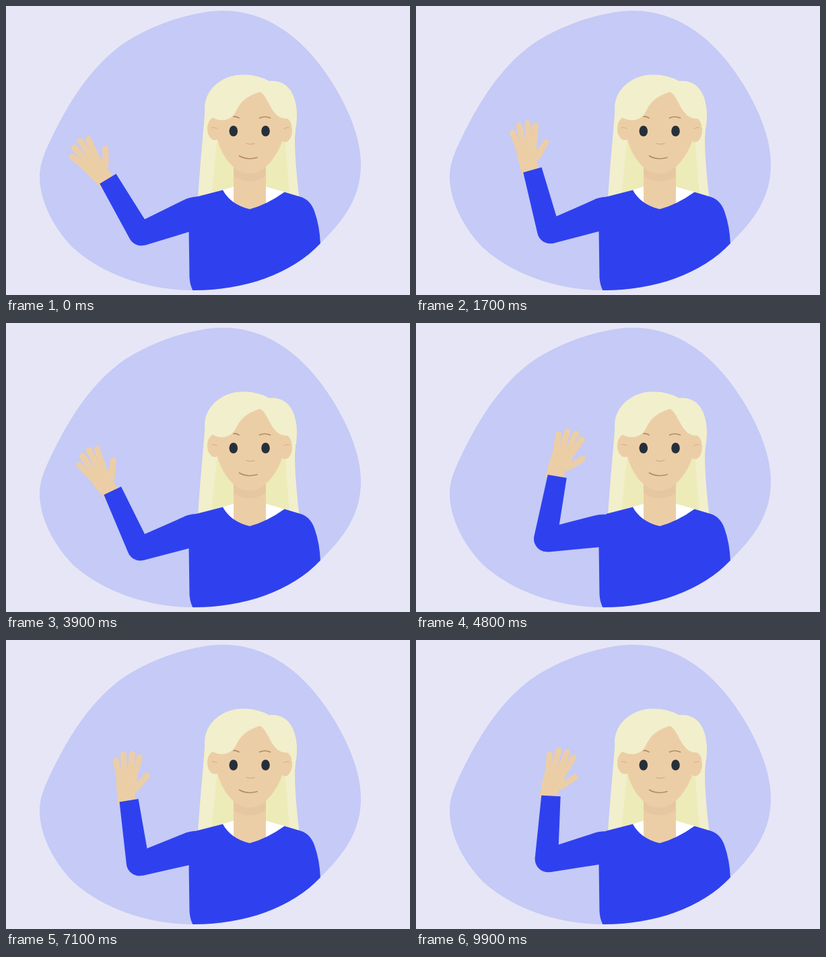
Animation, 600 px wide and 431 px high, one loop 10 s. Source, as an HTML page:

```html
<!DOCTYPE html>
<html lang="en">
<head>
<meta charset="utf-8">
<title>Waving woman</title>
<style>
  html, body { margin: 0; width: 100%; height: 100%; overflow: hidden; background: #e6e6f6; }
  svg { display: block; width: 100vw; height: 100vh; }
  .blob { fill: #c5caf6; }
  .blue { fill: #2f41ee; }
  .skin { fill: #eccea6; }
  .shade { fill: #e6c7a2; }
  .hair { fill: #f2efcc; }
  .hair-back { fill: #edebb8; }
  .eye { fill: #27303a; }
  .line { fill: none; stroke: #b18c62; stroke-width: 1.7; stroke-linecap: round; }
  .soft { stroke: #d8b186; stroke-width: 1.4; }
  .fingers { fill: none; stroke: #eccea6; stroke-width: 9; stroke-linecap: round; }
</style>
</head>
<body>
<svg viewBox="0 0 600 431">
  <defs>
    <path id="blob" d="M322 7C392 7 447 53 485 115C511 157 527 200 527 236C527 285 503 318 467 354C424 400 354 424 278 424C207 424 140 398 99 360C70 330 50 290 50 254C50 235 58 217 68 196C95 140 125 95 165 63C205 32 275 7 322 7Z"/>
    <clipPath id="inside"><use href="#blob"/></clipPath>
  </defs>
  <use href="#blob" class="blob"/>

  <!-- head -->
  <path class="hair" d="M296 148C293 190 288 240 285 286H435.500Q429 232 429 197L432 160Z"/>
  <path class="hair-back" d="M314 195L305 284H421L414 195Z"/>
  <path fill="#fff" d="M322 274.500L338 269.500H386L413.500 277.500L390 300L362 308L334 300Z"/>
  <path class="skin" d="M338 235V298L362 308L386 300V235Z"/>
  <path class="shade" d="M338 240V254Q361 269 385.500 254V240Z"/>
  <ellipse class="skin" cx="310" cy="183" rx="11" ry="17"/>
  <ellipse class="skin" cx="414.500" cy="185" rx="10.500" ry="18"/>
  <path class="skin" d="M312 150L313 196C321 226 336 242 350 248Q361 252 373 248C390 240 404 222 412 196L414 150L378 122Z"/>
  <path class="hair" d="M377 128C386 132 390 148 399 159Q405 168 418 168Q425 169 424.500 182L431 180Q433 160 431 150C428 126 414 109 391 112Q373 102 352 102.500C326 102 296 120 295 152L296.500 164Q303 162 308 167C320 173 334 171 341 158C348 144 354 136 377 128Z"/>
  <path class="line soft" d="M306 181.500Q310 181 313 183M413 183Q416 181 420 181.500M357 205Q363 207 369 205"/>
  <path class="line" d="M338 165Q342 164.500 346 167M376.500 167Q384 163.500 392.500 167M346.500 223.500Q358 230.500 373 226"/>
  <ellipse class="eye" cx="337.800" cy="186.500" rx="6.300" ry="8.100"/>
  <ellipse class="eye" cx="385.500" cy="186.500" rx="6.300" ry="8.100"/>

  <!-- arm -->
  <g id="hand">
    <path class="skin" d="M162.500 198L163.500 222L166 246L191 243L191 228Q192.500 225 200 217L195 212Q193.500 211 193.500 206L193 200L178 198Z"/>
    <path class="fingers" d="M162.300 180L167.500 206M173.300 171L175 204M186.500 169.500L183 204M197.500 175L189 206M208.300 202L193 221"/>
  </g>
  <path id="forearm" class="blue" d="M-17.400-94L11-94.800L14-19.700L16 11A19.500 19.500 0 0 1-19.500-1Z"/>
  <path id="upper" class="blue" d="M-80 16.300L-68.200 11.800L-14-9Q-5-13 8-13L40 20L0 36.400L-75.300 52.100Z"/>

  <path class="blue" clip-path="url(#inside)" d="M283 284.500L322 274.500C330 289 342 298 362 303Q388 296 413.500 277.500L437 284.500Q452 289 458 306Q466 328 467 356V431H282Q273.500 421 272.500 405L271 296Z"/>
</svg>
<script>
  const LOOP = 10000, STEP = 100, PERIOD = 4000 / 3;
  const SHOULDER = [277, 298];
  const ELBOW = [-79.3, 33];
  const [hand, forearm, upper] = ["hand", "forearm", "upper"].map(id => document.getElementById(id));

  // A swing around mid that is lowest at the given phase
  const swing = (phase, mid, size, low) => mid - size * Math.cos(2 * Math.PI * (phase - low));

  function pose(ms) {
    const phase = Math.floor(ms % LOOP / STEP) * STEP / PERIOD;
    const lift = swing(phase, 0, 6.4, 0.1);
    const bend = swing(phase, -9.7, 21.6, 0.06);
    const wrist = swing(phase, -6.9, 11.3, -0.03);

    const r = lift * Math.PI / 180, c = Math.cos(r), s = Math.sin(r);
    const x = SHOULDER[0] + ELBOW[0] * c - ELBOW[1] * s;
    const y = SHOULDER[1] + ELBOW[0] * s + ELBOW[1] * c;
    const lower = `translate(${x} ${y}) rotate(${bend})`;

    upper.setAttribute("transform", `translate(${SHOULDER}) rotate(${lift})`);
    forearm.setAttribute("transform", lower);
    hand.setAttribute("transform", `${lower} translate(-3 -94) rotate(${wrist + 8}) translate(-182.2 -239.7)`);
  }

  const start = performance.now();
  function tick() {
    pose(performance.now() - start);
    requestAnimationFrame(tick);
  }
  tick();
</script>
</body>
</html>
```
